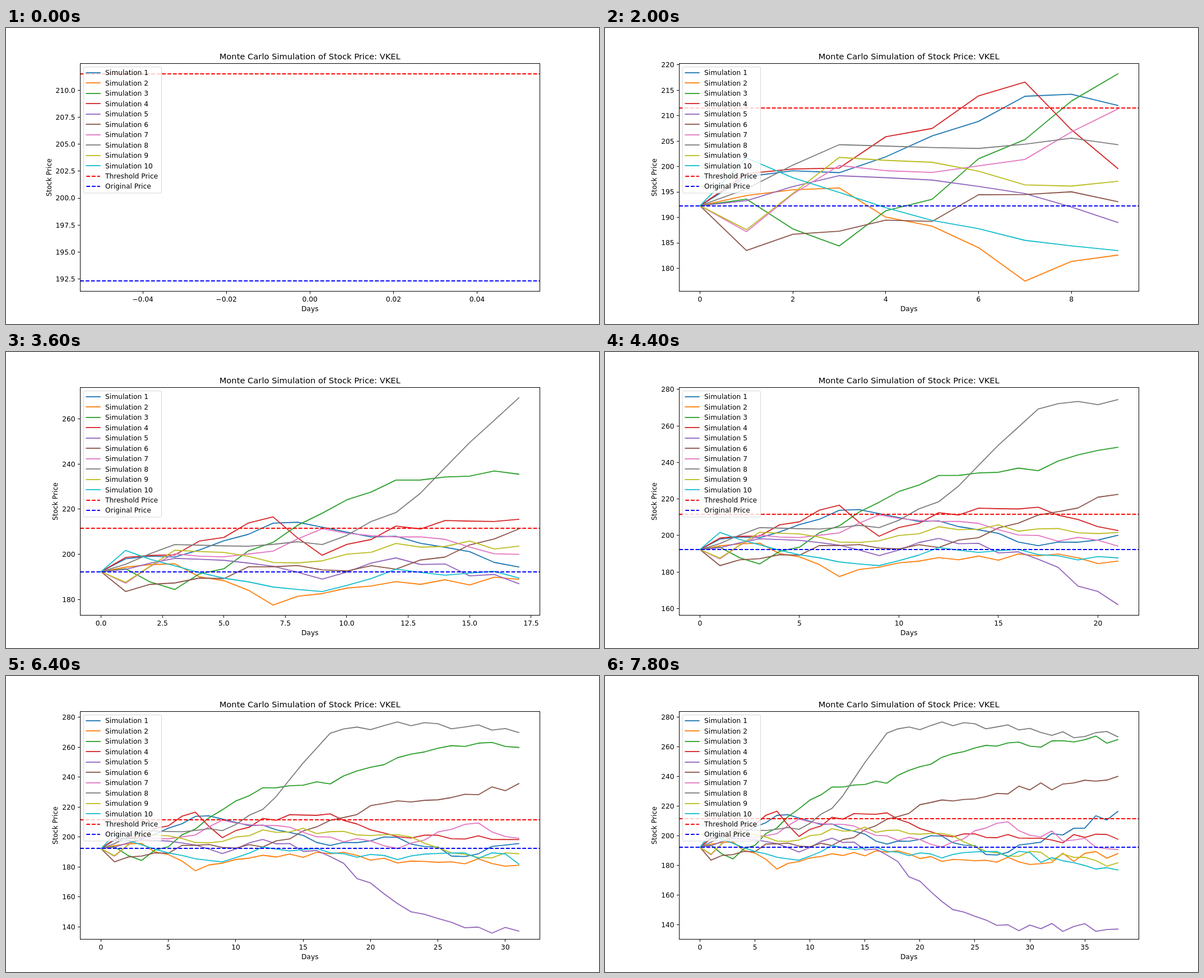
Recreate the animation shown at these times as an HTML page with a canvas. Size 1058 by 529 pixels, loop 8 s.

```html
<!DOCTYPE html>
<html lang="en">
<head>
<meta charset="utf-8">
<title>Monte Carlo Simulation</title>
<style>
  html, body { margin: 0; width: 100%; height: 100%; overflow: hidden; background: #fff; }
  canvas { display: block; }
</style>
</head>
<body>
<canvas id="chart" width="1058" height="529"></canvas>
<script>
const canvas = document.getElementById('chart');
const ctx = canvas.getContext('2d');

const LOOP = 8000, STEP = 200;
const START = 192.3, THRESHOLD = START * 1.1;
const LEFT = 132.25, RIGHT = 952.2, TOP = 63.5, BOTTOM = 470.8;
const FONT = 12.25, LINE = 1.84, DASH = [6.8, 2.94];

// Prices at a few days; the days between follow the trend with a seeded wobble.
const knotDays = [1, 3, 7, 9, 12, 17, 22, 27, 38];
const simulations = {
  '#1f77b4': [198, 198.8, 213.8, 212, 208, 194.4, 199.8, 187, 216.4],
  '#ff7f0e': [194.3, 195.8, 177.5, 182.6, 187.9, 188.9, 182.7, 182.2, 187.9],
  '#2ca02c': [193.6, 184.4, 205.3, 218.2, 232.9, 235.5, 253, 260.5, 264.9],
  '#d62728': [198.6, 199.7, 216.6, 199.6, 212.5, 215.5, 200.3, 198.7, 197.7],
  '#9467bd': [193.3, 198.2, 194.7, 189, 198.4, 187, 155.6, 139.5, 137],
  '#8c564b': [183.5, 187.3, 194.5, 193.1, 193.4, 211.2, 224.2, 228.6, 240.1],
  '#e377c2': [187.2, 200.2, 201.4, 211.3, 207.7, 200, 192.4, 208.5, 190.7],
  '#7f7f7f': [195.6, 204.3, 204.4, 204.3, 218.5, 269.3, 276.9, 273.5, 266.8],
  '#bcbd22': [187.6, 201.8, 196.4, 197.1, 204.8, 203.6, 201.6, 188.5, 181.7],
  '#17becf': [201.7, 194.9, 185.5, 183.5, 193.4, 189.5, 185, 189.4, 176.9]
};
const colors = Object.keys(simulations);

function wobble(seed, day) {
  const v = Math.sin(seed * 13 + day * 78.2) * 43758;
  return v - Math.floor(v) - 0.5;
}

const runs = colors.map((color, seed) => {
  const trend = [START], path = [START];
  simulations[color].forEach((price, k) => {
    const from = trend.length - 1, base = trend[from], gap = knotDays[k] - from;
    for (let i = 1; i <= gap; i++) {
      const value = base + (price - base) * i / gap;
      trend.push(value);
      path.push(i < gap ? value + wobble(seed, from + i) * Math.sqrt(gap) * 2 : value);
    }
  });
  return { color, trend, path };
});

function padded(lo, hi) {
  const pad = (hi - lo) * 0.05;
  return [lo - pad, hi + pad];
}

// Smallest round step that gives at most nine intervals.
function ticks([lo, hi]) {
  const raw = (hi - lo) / 9;
  const power = 10 ** Math.floor(Math.log10(raw));
  const step = +([1, 2, 2.5, 5, 10].find(m => m * power >= raw) * power).toPrecision(3);
  const digits = (String(step).split('.')[1] || '').length;
  const list = [];
  for (let i = Math.ceil(lo / step); i * step <= hi; i++) {
    list.push({ value: i * step, label: (i * step).toFixed(digits).replace('-', '\u2212') });
  }
  return list;
}

function line(points, color, width = LINE, dash = []) {
  ctx.beginPath();
  points.forEach(([x, y]) => ctx.lineTo(x, y));
  ctx.strokeStyle = color;
  ctx.lineWidth = width;
  ctx.lineCap = dash.length || width < LINE ? 'butt' : 'square';
  ctx.lineJoin = 'round';
  ctx.setLineDash(dash);
  ctx.stroke();
}

function text(str, x, y, align = 'center', size = FONT) {
  ctx.font = `${size}px "DejaVu Sans", sans-serif`;
  ctx.textAlign = align;
  ctx.fillStyle = '#000';
  ctx.fillText(str, x, y);
}

const snap = v => Math.floor(v) + 0.5;

function drawLegend() {
  ctx.beginPath();
  ctx.roundRect(138.5, 69.5, 139, 225.5, 2.5);
  ctx.fillStyle = '#fffc';
  ctx.fill();
  ctx.setLineDash([]);
  ctx.strokeStyle = '#cccc';
  ctx.lineWidth = 1;
  ctx.stroke();
  const rows = colors.map((color, i) => [`Simulation ${i + 1}`, color, []]);
  rows.push(['Threshold Price', 'red', DASH], ['Original Price', 'blue', DASH]);
  rows.forEach(([label, color, dash], i) => {
    const y = 80 + i * 18.46;
    line([[143.3, Math.round(y)], [167.8, Math.round(y)]], color, LINE, dash);
    text(label, 177, Math.round(y + 4.4), 'left');
  });
}

function drawAxes(xTicks, yTicks, toX, toY) {
  xTicks.forEach(({ value, label }) => {
    const x = snap(toX(value));
    line([[x, BOTTOM], [x, BOTTOM + 4.3]], 'black', 1);
    text(label, toX(value), 489);
  });
  let widest = 0;
  yTicks.forEach(({ value, label }) => {
    const y = snap(toY(value));
    line([[LEFT, y], [LEFT - 4.3, y]], 'black', 1);
    text(label, LEFT - 8.6, Math.round(toY(value) + 4.4), 'right');
    widest = Math.max(widest, ctx.measureText(label).width);
  });
  ctx.lineJoin = 'miter';
  ctx.strokeRect(snap(LEFT), snap(TOP), 820, 407);

  const middle = (LEFT + RIGHT) / 2;
  text('Days', middle, 506);
  text('Monte Carlo Simulation of Stock Price: VKEL', middle, 56, 'center', FONT * 1.2);
  ctx.save();
  ctx.translate(Math.round(LEFT - 16.4 - widest), (TOP + BOTTOM) / 2);
  ctx.rotate(-Math.PI / 2);
  text('Stock Price', 0, 0);
  ctx.restore();
}

function draw(day) {
  const seen = runs.flatMap(run => run.trend.slice(0, day + 1));
  const yRange = padded(Math.min(...seen), Math.max(THRESHOLD, ...seen));
  const xRange = day ? padded(0, day) : [-0.055, 0.055];
  const toX = v => LEFT + (v - xRange[0]) / (xRange[1] - xRange[0]) * (RIGHT - LEFT);
  const toY = v => BOTTOM - (v - yRange[0]) / (yRange[1] - yRange[0]) * (BOTTOM - TOP);
  const level = (price, color) => {
    const y = Math.round(toY(price));
    line([[LEFT, y], [RIGHT, y]], color, LINE, DASH);
  };

  ctx.fillStyle = '#fff';
  ctx.fillRect(0, 0, canvas.width, canvas.height);
  if (day) {
    runs.forEach(({ path, color }) =>
      line(path.slice(0, day + 1).map((p, d) => [toX(d), toY(p)]), color));
  }
  level(THRESHOLD, 'red');
  level(START, 'blue');
  drawAxes(ticks(xRange), ticks(yRange), toX, toY);
  drawLegend();
}

const began = performance.now();
function tick() {
  const time = (performance.now() - began) % LOOP;
  draw(Math.max(0, Math.floor(time / STEP) - 1));
  requestAnimationFrame(tick);
}
tick();
</script>
</body>
</html>
```
